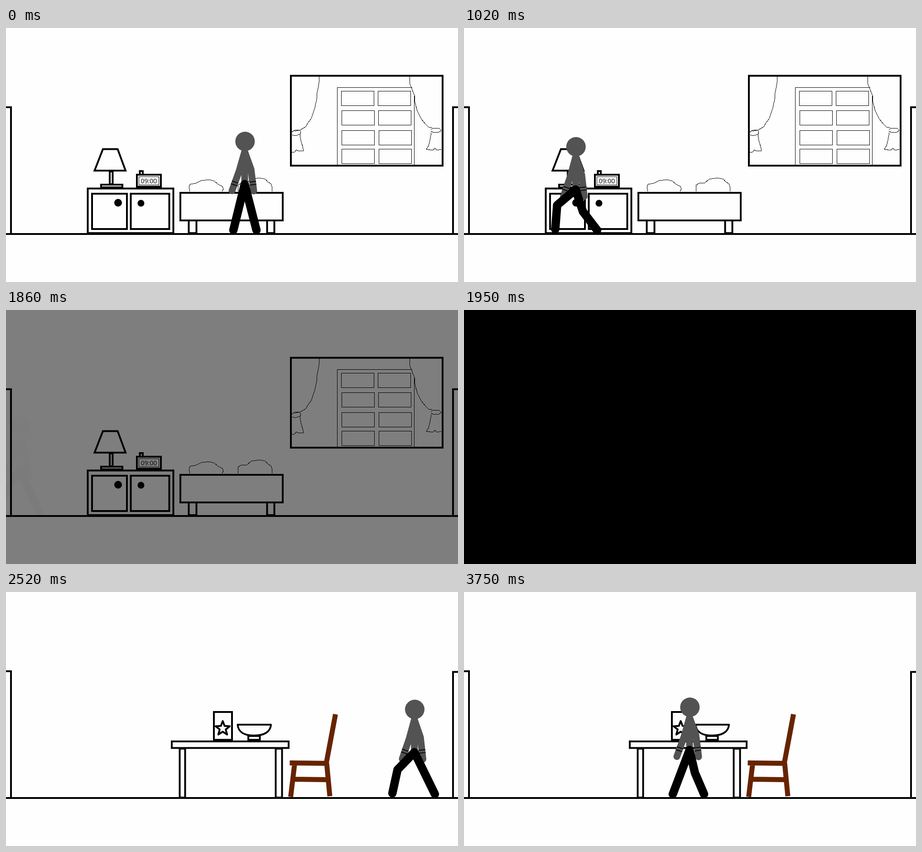
Write an HTML page that moves like this. It is 998 px wide and 561 px high and loops after 4200 ms.

```html
<!DOCTYPE html>
<html lang="en">
<head>
<meta charset="utf-8">
<title>Morning walk</title>
<style>
  html, body { margin: 0; width: 100%; height: 100%; overflow: hidden; background: #fefefe; }
  svg { display: block; width: 100vw; height: 100vh; }
  .bold { fill: none; stroke: #000; stroke-width: 4; }
  .thin { fill: none; stroke: #000; stroke-width: 1; shape-rendering: crispEdges; }
  .chair { fill: none; stroke: #672300; stroke-width: 11; }
  .skin { fill: none; stroke: #535353; stroke-width: 15; stroke-linecap: round; stroke-linejoin: round; }
  .cuff { fill: none; stroke: #000; stroke-width: 1.8; }
  .legs { fill: none; stroke: #000; stroke-width: 18.5; stroke-linecap: round; stroke-linejoin: round; }
  text { font: 14px "Open Sans", "Noto Sans", sans-serif; }
</style>
</head>
<body>
<svg viewBox="0 0 998 561" preserveAspectRatio="none">
  <rect width="998" height="561" fill="#fefefe"/>
  <path class="bold" d="M0 455H998M0 175H11V455"/>

  <g id="bedroom">
    <path class="bold" d="M998 175H987V455"/>
    <g class="thin">
      <path d="M731.5 303V131.5H897M901.5 150V303"/>
      <path id="panes"/>
      <path d="M691 107L692 114 690 128 687 143 686 157 682 176 678 188 674 200 667 209 662 218 650 225 637 228"/>
      <path d="M631 230L637 226 648 225 651 230 649 235 638 238 632 236M649 235L651 248 655 262 657 271 645 272 641 269 637 274 631 274"/>
      <path d="M891 107L892 124 897 137 902 149 903 164 908 183 917 201 926 212 933 219 941 220"/>
      <path d="M938 224L944 221 957 222 961 226 956 230 943 231 938 227M939 231L936 248 933 260 928 268 943 270 947 265 951 270 961 268"/>
      <path d="M406 361L404 350 407 345 419 343 431 337 449 335 460 338 468 345 478 350 480 356 477 361"/>
      <path d="M512 361V347L519 343 532 342 541 334 560 331 573 334 578 340 585 344 587 350V361"/>
    </g>
    <rect class="bold" x="629" y="105.5" width="335" height="198.5"/>
    <g class="bold">
      <path d="M214 267.500H246.500L264 315H195.500Z"/>
      <rect x="229" y="317" width="6.500" height="28" stroke-width="4"/>
      <rect x="210" y="346" width="47" height="6"/>
      <rect x="289" y="324" width="53" height="28"/>
      <path d="M289 350.500H342M295.500 323V316H302V323"/>
      <rect x="180.500" y="354.500" width="189" height="98.500"/>
      <rect x="190" y="366" width="77" height="78"/>
      <rect x="275.500" y="366" width="85" height="78"/>
      <rect x="385" y="364" width="226" height="61"/>
      <path d="M403.500 426V453H420.500V426M576.500 426V453H592.500V426"/>
    </g>
    <rect class="thin" x="293.500" y="328.500" width="44" height="18"/>
    <text x="297.500" y="343">09:00</text>
    <circle cx="247.500" cy="386" r="8.500"/>
    <circle cx="298" cy="387" r="7.500"/>
  </g>

  <g id="kitchen">
    <g class="bold">
      <path d="M998 176.500H987V455"/>
      <rect x="366" y="330" width="258" height="14.500"/>
      <rect x="383.500" y="346" width="12" height="108"/>
      <rect x="595.500" y="346" width="14" height="108"/>
      <rect x="459" y="265" width="40" height="61.500"/>
      <path id="star" stroke-linejoin="round"/>
      <path d="M511.500 293H585C584 309 570 317 548 317S512.500 309 511.500 293Z" stroke-linejoin="round"/>
      <rect x="535" y="318" width="25.500" height="8.500"/>
    </g>
    <path class="chair" d="M727.500 270L707 379M708 378L715 451M637 382L628.500 452.500M626.500 377.500L713 378.500M636 413.500L709 414.500"/>
  </g>

  <g id="walker">
    <path class="skin" id="body"/>
    <circle id="head" r="21.500" fill="#535353"/>
    <path class="cuff" id="cuffs"/>
    <path class="legs" id="legs"/>
  </g>
  <rect id="shade" width="998" height="561"/>
</svg>
<script>
const $ = id => document.getElementById(id);
const LOOP = 4200, FRAME = 30, STEP = 300;
const GROUND = 446.5;

// feet: back foot, front foot, then each landing; hips: one [x, y] per landing
const walks = [
  { start: 150,
    feet: [553, 502, 395, 294, 180, 73, -25],
    hips: [[527, 345], [447, 355], [341, 356], [236, 358], [132, 356], [30, 351]] },
  { start: 2250,
    feet: [998, 947, 837, 729, 625, 530, 461],
    hips: [[980, 345], [893, 356], [786, 355], [680, 355], [580, 355], [498, 349]] }
];

const clamp = (v, lo = 0, hi = 1) => Math.min(hi, Math.max(lo, v));
const mix = (a, b, u) => a + (b - a) * u;
const mixPoint = (a, b, u) => [mix(a[0], b[0], u), mix(a[1], b[1], u)];
const line = (...points) => "M" + points.map(p => p.map(n => n.toFixed(2)).join(" ")).join("L");

// Bends the knee forward (left) so that the leg keeps its length.
function leg(hip, foot, length) {
  const dx = foot[0] - hip[0], dy = foot[1] - hip[1];
  const reach = Math.hypot(dx, dy);
  const bend = Math.sqrt(Math.max(0, length * length - reach * reach)) / 2;
  const knee = [(hip[0] + foot[0]) / 2 - bend * dy / reach,
                (hip[1] + foot[1]) / 2 + bend * dx / reach];
  return line(hip, knee, foot);
}

function arm(hip, swing, dip) {
  const at = p => [hip[0] + p[0], hip[1] + p[1]];
  const elbow = at(mixPoint([-12, -30], [14, -33], swing));
  const hand = at(mixPoint([-28, 14.5], [20, 15], swing));
  hand[1] += dip;
  const dx = elbow[0] - hand[0], dy = elbow[1] - hand[1], size = Math.hypot(dx, dy);
  const ux = dx / size, uy = dy / size;
  const cuffs = [14, 20.5].map(d => {
    const x = hand[0] + ux * d, y = hand[1] + uy * d;
    return line([x - uy * 7.5, y + ux * 7.5], [x + uy * 7.5, y - ux * 7.5]);
  }).join("");
  return { limb: line(at([0, -72]), elbow, hand), cuffs };
}

function drawWalker({ start, feet, hips }, t) {
  const progress = clamp((t - start) / STEP, 0, 5);
  const i = Math.min(4, Math.floor(progress)), u = progress - i;
  const rise = Math.sin(Math.PI * u) ** 2;
  const hip = mixPoint(hips[i], hips[i + 1], u);
  hip[1] -= 11 * rise;

  const moving = [mix(feet[i], feet[i + 2], u), GROUND - 20 * rise];
  const planted = [feet[i + 1], GROUND];
  const flex = 4 * Math.min(1, 10 * u, 10 * (1 - u));
  $("legs").setAttribute("d", leg(hip, moving, 103 + flex) + leg(hip, planted, 103));

  const swing = (1 - Math.cos(Math.PI * u)) / 2;
  const arms = [arm(hip, swing, 4 * rise), arm(hip, 1 - swing, 4 * rise)];
  const torso = line([hip[0], hip[1] - 72], hip);
  $("body").setAttribute("d", torso + arms.map(a => a.limb).join(""));
  $("cuffs").setAttribute("d", arms.map(a => a.cuffs).join(""));
  $("head").setAttribute("cx", hip[0] + 0.8);
  $("head").setAttribute("cy", hip[1] - 94.5);
}

function render(time) {
  const t = Math.floor((time % LOOP) / FRAME + 1e-6) * FRAME;
  const second = t >= 2100;
  $("bedroom").style.display = second ? "none" : "";
  $("kitchen").style.display = second ? "" : "none";
  drawWalker(walks[+second], t);
  const visible = second ? clamp((t - 2220) / 180) : clamp((1650 - t) / 210, 0.02);
  $("walker").setAttribute("opacity", visible);
  const dark = second ? (2250 - t) / 180 : (t - 1770) / 180;
  $("shade").setAttribute("opacity", clamp(dark));
}

function drawStar() {
  const points = Array.from({ length: 10 }, (_, k) => {
    const r = k % 2 ? 7 : 16.5, a = k * Math.PI / 5;
    return [478.5 + r * Math.sin(a), 301.5 - r * Math.cos(a)];
  });
  $("star").setAttribute("d", line(...points) + "Z");
}

function drawPanes() {
  const tops = [139.5, 182.5, 226.5, 267.5];
  $("panes").setAttribute("d", tops.map((y, k) =>
    [740.5 + (k > 0), 821.5 + Math.min(k, 2)].map(x => `M${x} ${y}h71.500v31.500h-71.500z`).join("")
  ).join(""));
}

drawStar();
drawPanes();
const begin = performance.now();
(function tick() {
  render(performance.now() - begin);
  requestAnimationFrame(tick);
})();
</script>
</body>
</html>
```
